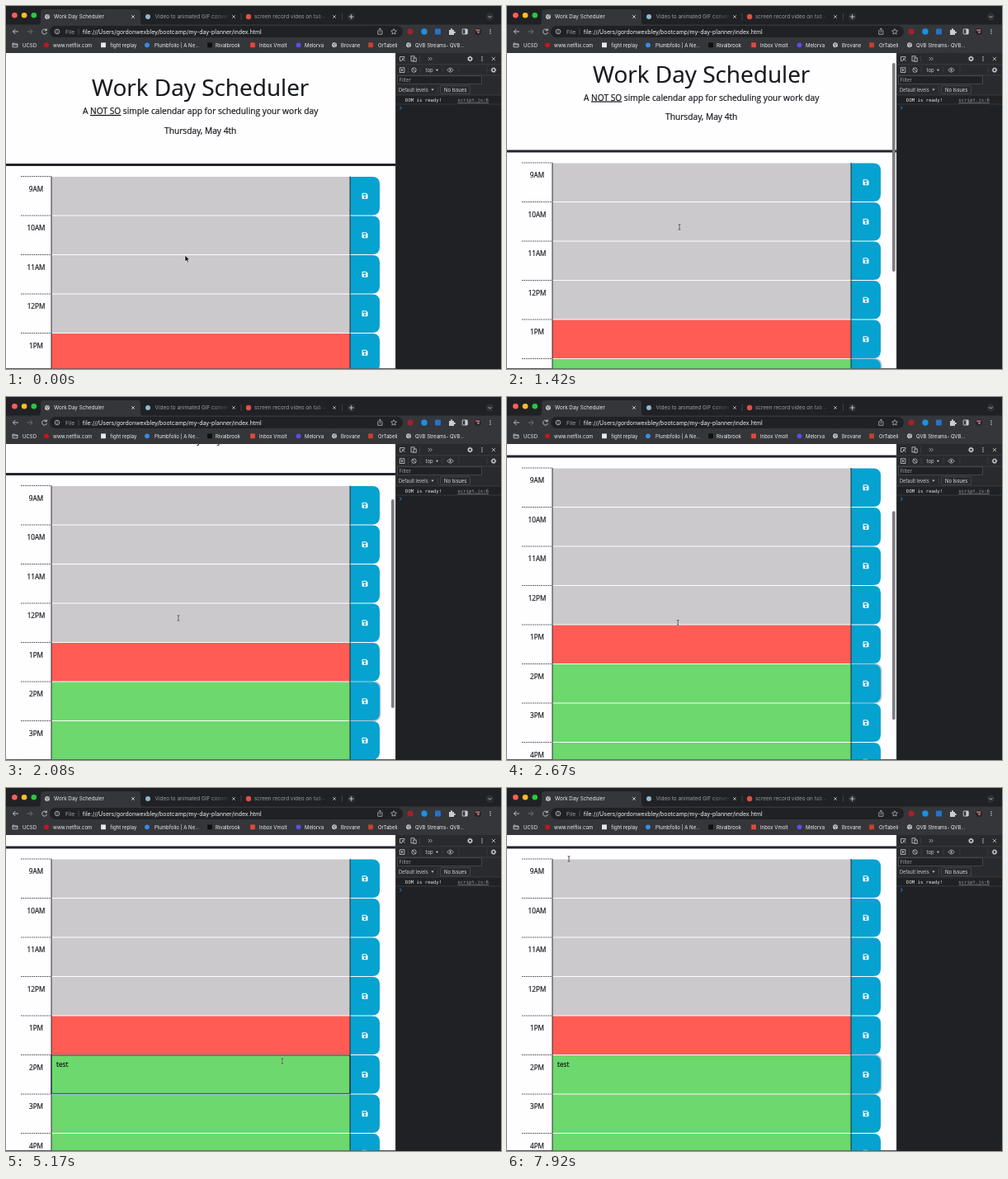
Animation of 600x440 px, one loop 8000 ms. Source, as an HTML page:

```html
<!DOCTYPE html>
<html lang="en">
<head>
<meta charset="utf-8">
<title>Work Day Scheduler</title>
<style>
  html, body { margin: 0; width: 100%; height: 100%; overflow: hidden; background: #202124; }
  svg { display: block; width: 600px; height: 440px; }
  text { white-space: pre; }
  #page text { stroke: #0c0d10; stroke-width: .18px; }
</style>
</head>
<body>
<svg id="stage" viewBox="0 0 600 440" xmlns="http://www.w3.org/2000/svg"></svg>
<script>
const LOOP = 8000;
const UI = "Inter, sans-serif";
const PAGE = "'Open Sans', sans-serif";
const MONO = "'DejaVu Sans Mono', monospace";
const INK = "#15171b", ICON = "#c9cbce", BAR = "#35363a", DARK = "#202124";
const ROW_TOP = 206.5, PITCH = 47.5, MAX_SCROLL = 120.5;

const text = (x, y, s, size, fill, font = UI, extra = "") =>
  `<text x="${x}" y="${y}" font-size="${size}" fill="${fill}" font-family="${font}" ${extra}>${s}</text>`;
const rect = (x, y, w, h, fill, extra = "") =>
  `<rect x="${x}" y="${y}" width="${w}" height="${h}" fill="${fill}" ${extra}/>`;
const dot = (x, y, r, fill, extra = "") =>
  `<circle cx="${x}" cy="${y}" r="${r}" fill="${fill}" ${extra}/>`;
const line = (d, stroke = ICON, w = 0.9, extra = "") =>
  `<path d="${d}" fill="none" stroke="${stroke}" stroke-width="${w}" ${extra}/>`;

const cross = (x, y, r = 1.8, c = ICON) =>
  line(`M${x - r} ${y - r}l${2 * r} ${2 * r}m0 ${-2 * r}l${-2 * r} ${2 * r}`, c, 0.8);
const globe = (x, y) => dot(x, y, 3, "#c3c6ca") +
  line(`M${x - 2} ${y - 1}q2 .2 1.8 1.6t1.6 1.6M${x + 0.6} ${y - 2.4}q-.4 1.8 1.6 2`, "#55585d", 0.8);
const folder = (x, y) =>
  line(`M${x - 3} ${y - 2.2}h2.2l.8.9h3v3.8h-6zM${x - 3} ${y - 0.4}h6`, "#d5d7da", 0.8);
const dots = (x, y) => [-2.2, 0, 2.2].map(d => dot(x, y + d, 0.75, ICON)).join("");
const gear = (x, y) => dot(x, y, 2, "none", `stroke="${ICON}" stroke-width="1.3"`) +
  dot(x, y, 2.9, "none", `stroke="${ICON}" stroke-width=".9" stroke-dasharray="1.1 1.18"`);
const caretDown = (x, y) => `<path d="M${x - 1.6} ${y - 1}h3.2l-1.6 2.3z" fill="${ICON}"/>`;

function tabs() {
  let s = rect(0, 0, 600, 23, DARK);
  ["#fe5f57", "#febc2e", "#28c840"].forEach((c, i) => s += dot(10.4 + 11.7 * i, 11.3, 3.3, c));
  s += `<path d="M38 23q4 0 4-4V8q0-4 4-4H159q4 0 4 4V19q0 4 4 4z" fill="${BAR}"/>`;
  s += globe(50, 13) + text(58, 15.3, "Work Day Scheduler", 6.3, "#e8eaed") + cross(154, 13, 1.8, "#e8eaed");
  s += dot(172, 13, 3, "#8fb6cf") + text(180.6, 15.3, "Video to animated GIF conver", 6.4, "#9a9da1");
  s += dot(294, 13, 3.2, "#dd5145") + text(301, 15.3, "screen record video on tab - ", 6.4, "#9a9da1");
  for (const x of [272, 394])
    s += rect(x - 22, 8, 22, 10, "url(#fade)") + rect(x, 8, 9, 10, DARK) + cross(x + 4, 13);
  s += line("M285 9v8M407.5 9v8", "#55585c", 0.6);
  s += dot(418.6, 13, 4.5, "#303135") + line("M415.8 13h5.6M418.6 10.2v5.6");
  s += dot(586.5, 13, 4.5, "#303135") + line("M584.6 12.2l1.9 1.9 1.9-1.9");
  return s;
}

function toolbar() {
  let s = rect(0, 22.5, 600, 34.5, BAR);
  s += line("M15 31H8.5M11.4 28L8.4 31l3 3");
  s += line("M25.5 31H32M29.1 28l3 3-3 3", "#74777c");
  s += line("M49 29.3A3 3 0 1 0 49.5 32M49.3 27.4v2.4h-2.4");
  s += rect(53, 24, 428, 14, DARK, 'rx="7"');
  s += dot(62, 31, 2.8, "none", `stroke="${ICON}" stroke-width=".8"`) + line("M62 30.6v2M62 29v.8", ICON, 0.8);
  s += text(72, 33.7, "File", 6.8, "#9aa0a6") + line("M88 27.5v7", "#5f6368", 0.7);
  s += text(92.7, 33.7, "file:///Users/gordonwexbley/bootcamp/my-day-planner/index.html", 6.93, "#eef0f2");
  s += line("M452 29.8h-1.3v4.5h5.2v-4.5h-1.3M453.3 32.4v-5.2M451.7 28.6l1.6-1.6 1.6 1.6", ICON, 0.7);
  s += line("M470 27.7l1 2.1 2.4.3-1.8 1.6.5 2.4-2.1-1.2-2.1 1.2.5-2.4-1.8-1.6 2.4-.3z", ICON, 0.7);
  s += dot(490, 31, 3.5, "#a3222b") + dot(507, 31, 3.7, "#1e8fe0") + rect(520, 27.5, 7, 7, "#2473c8", 'rx="1"');
  s += `<path d="M537 29h2q-.4-2 1-2t1 2h2v2q2-.4 2 1t-2 1v2h-6z" fill="${ICON}"/>`;
  s += rect(553.2, 28, 6, 6, "none", `stroke="${ICON}" stroke-width=".9" rx=".5"`) + rect(556.4, 28, 2.8, 6, ICON);
  s += dot(572, 31, 4, "#2a2022") + rect(569.3, 28.3, 5, 2, "#b76b70") + dot(572.5, 31.8, 1.4, "#8b8589");
  s += dots(587, 31);

  const disc = c => (x, y) => dot(x, y, 2.9, c);
  const tile = c => (x, y) => rect(x - 2.9, y - 2.9, 5.8, 5.8, c);
  const marks = [
    [11, 20, "UCSD", folder], [49, 57, "www.netflix.com", disc("#c4161f")],
    [118, 126.3, "fight replay", tile("#e8eaed")], [171, 180, "Plumbfolio | A Ne...", disc("#3a8de0")],
    [247, 254, "Rivalbrook", tile("#0c120e")], [299, 307, "Inbox Vmolt", tile("#e0483c")],
    [354.5, 362, "Melorva", disc("#5b4df0")], [398, 406, "Brovane", globe],
    [442, 451, "OrTabeli", tile("#c8402f")], [488, 496, "QVB Streams- QVB...", globe]
  ];
  for (const [ix, tx, name, icon] of marks)
    s += icon(ix, 47.3) + text(tx, 49.5, name, 6, "#eceef0");
  return s;
}

function devtools() {
  let s = rect(472, 57, 128, 383, DARK) + rect(472, 57, 128, 51, "#292a2d");
  s += line("M472 70.8h128M472 84h128M472 108h128M472 119h128", "#46484c", 0.6);
  s += line("M472.4 57v383", "#46484c", 0.7);
  s += line("M480 66.5h-2.5v-5h5.5v2M480.5 63.8l3 3M480.5 66v-2.2h2.2", ICON, 0.8);
  s += rect(491, 60.8, 4, 6, "none", `stroke="${ICON}" stroke-width=".8"`) + rect(494, 63, 3.2, 4.2, "#292a2d", `stroke="${ICON}" stroke-width=".8"`);
  s += line("M487.5 73.5v8M501.5 60v8M502 73.5v8M529 73.5v8M549 73.5v8M583 73.5v8", "#46484c", 0.6);
  s += line("M511.8 62l2 2-2 2M514.4 62l2 2-2 2", ICON, 0.7);
  s += gear(562.5, 64) + dots(577, 64) + cross(591, 64, 2.1);
  s += rect(477.3, 74.8, 5.6, 5.6, "none", `stroke="${ICON}" stroke-width=".8"`) + `<path d="M479.2 76v3.2l2.4-1.6z" fill="${ICON}"/>`;
  s += dot(494.5, 77.6, 2.7, "none", `stroke="${ICON}" stroke-width=".8"`) + line("M492.6 75.7l3.8 3.8", ICON, 0.8);
  s += text(508.5, 79.8, "top", 6, ICON) + caretDown(522.5, 77.8);
  s += line("M534.8 77.6q3.7-5 7.4 0q-3.7 5-7.4 0z", ICON, 0.8) + dot(538.5, 77.6, 1.1, ICON) + gear(591, 77.6);
  s += rect(474.3, 84.8, 102, 9.8, DARK, 'stroke="#5a5c60" stroke-width=".6"') + text(476.5, 92.1, "Filter", 6, "#9aa0a6");
  s += text(476, 103.7, "Default levels", 5.6, ICON) + caretDown(517, 101.5);
  s += line("M523.5 97v9", "#46484c", 0.6);
  s += rect(526.5, 96.6, 36, 9.6, "none", 'stroke="#55575b" stroke-width=".6" rx="1"') + text(531, 103.7, "No Issues", 5.85, "#dfe1e5");
  s += text(484, 116, "DOM is ready!", 5.65, "#e3e5e8", MONO);
  s += text(585, 116, "script.js:6", 5.7, "#9aa0a6", MONO, 'text-anchor="end" text-decoration="underline"');
  s += line("M477 121.5l2.6 2-2.6 2", "#2f7fd6", 0.9);
  return s;
}

const SAVE = "M-3.5-2.8q0-.7.7-.7h4.3l2 2v4.3q0 .7-.7.7h-5.6q-.7 0-.7-.7zM-2.4-2.4v1.9h3.9v-1.9zM1.2 1.5a1.2 1.2 0 1 0-2.4 0a1.2 1.2 0 1 0 2.4 0z";
const button = y => `M417 ${y + 0.5}h27q9 0 9 9v28.5q0 9-9 9h-27z`;

function row(label, i) {
  const y = ROW_TOP + PITCH * i;
  const fill = i < 4 ? "#cbc9cc" : i === 4 ? "#fe5c54" : "#6dd86d";
  return line(`M18 ${y}h37`, "#222", 0.8, 'stroke-dasharray="1.6 1"') +
    text(36.5, y + 18.3, label, 8.2, INK, PAGE, 'text-anchor="middle"') +
    rect(55, y + 0.5, 362, PITCH - 1, fill) +
    `<path d="${button(y)}" fill="#06a2d0"/>` +
    line(`M55 ${y}v${PITCH}M417 ${y}v${PITCH}`, "#1c1c20", 0.9) +
    `<path transform="translate(435 ${y + 23.7})" d="${SAVE}" fill="#fff" fill-rule="evenodd"/>`;
}

function page() {
  const mid = 'text-anchor="middle"', y2 = ROW_TOP + PITCH * 5;
  let s = text(235.7, 109.3, "Work Day Scheduler", 28, INK, PAGE, mid);
  s += text(235.7, 131, 'A <tspan text-decoration="underline">NOT SO</tspan> simple calendar app for scheduling your work day', 10.2, INK, PAGE, mid);
  s += text(235.7, 154.6, "Thursday, May 4th", 10.2, INK, PAGE, mid);
  s += rect(0, 191, 472, 3, "#25232d");
  s += `<path id="halo" d="${button(y2)}" fill="none" stroke="#8fa3b5" stroke-opacity=".6" stroke-width="3"/>`;
  s += ["9AM", "10AM", "11AM", "12PM", "1PM", "2PM", "3PM", "4PM", "5PM"].map(row).join("");
  s += `<g id="focus">${rect(55, y2 + 0.4, 362, PITCH - 1, "none", 'stroke="#12263a" stroke-width="1"')}${line(`M55 ${y2 + PITCH + 0.2}h362`, "#7fc0e8", 0.8)}</g>`;
  s += text(61, y2 + 14.6, "", 8.2, INK, PAGE, 'id="note"');
  return s;
}

const BEAM = "M-1.4-3.4q1.4 0 1.4 1v4.8q0 1-1.4 1M1.4-3.4Q0-3.4 0-2.4M1.4 3.4Q0 3.4 0 2.4";
const stage = document.getElementById("stage");
stage.innerHTML = `<defs>
  <linearGradient id="fade"><stop offset="0" stop-color="${DARK}" stop-opacity="0"/><stop offset="1" stop-color="${DARK}"/></linearGradient>
  <clipPath id="view"><rect x="0" y="57" width="472" height="382.3"/></clipPath></defs>
  ${rect(0, 0, 600, 440, DARK)}${tabs()}${toolbar()}
  <g clip-path="url(#view)">${rect(0, 57, 472, 383, "#fefdff")}<g id="page">${page()}</g>
  ${rect(467, 58, 3.6, 253, "#7c7b7e", 'id="thumb" rx="1.8"')}</g>
  ${devtools()}
  <g id="cursor">
    <path id="arrow" d="M0 0v8l1.9-1.7 1.3 2.9 1.3-.6-1.3-2.8h2.5z" fill="#111" stroke="#fff" stroke-width=".6"/>
    <g id="beam">${line(BEAM, "#fff", 1.9, 'stroke-opacity=".6"')}${line(BEAM, "#222", 0.8)}</g>
    <path id="hand" d="M-.8-3.5q.8-1 1.5 0v3l3 .8q.9.3.7 1.4l-.7 3h-4l-2.6-3.4q.2-1.2 2.1.2z" fill="#fff" stroke="#111" stroke-width=".6"/>
  </g>`;

const $ = id => document.getElementById(id);
const show = (id, on) => $(id).setAttribute("visibility", on ? "visible" : "hidden");
const ease = (t, a, b) => {
  const u = Math.min(1, Math.max(0, (t - a) / (b - a)));
  return u * u * (3 - 2 * u);
};

// Pointer legs: start, end, target x, target y, vertical bend
const LEGS = [
  [400, 1000, 209, 268, 0],
  [2550, 3250, 186, 340, 0],
  [4750, 5490, 433, 345, -12.5],
  [6250, 6880, 192, 289, 0],
  [6980, 7820, 75, 86, 0]
];

function pointer(t) {
  let x = 217, y = 302;
  for (const [a, b, tx, ty, bend] of LEGS) {
    const p = ease(t, a, b);
    x += (tx - x) * p;
    y += (ty - y) * p + 4 * bend * p * (1 - p);
  }
  return [x, y];
}

function draw(t) {
  // The page scrolls in half-pixel steps
  const scroll = Math.round(2 * MAX_SCROLL * ease(t, 1112, 2437)) / 2;
  $("page").setAttribute("transform", `translate(0 ${-scroll})`);
  $("thumb").setAttribute("y", 58 + scroll * 0.666);
  show("thumb", t > 1112 && t < 3000);

  const editing = t >= 3400 && t < 5900;
  show("focus", editing);
  show("halo", !editing);
  const typed = t < 4300 ? 0 : 1 + Math.floor((t - 4300) / 150);
  $("note").textContent = "test".slice(0, typed);

  const [x, y] = pointer(t);
  const kind = x > 417 ? "hand" : t < 550 ? "arrow" : "beam";
  for (const k of ["arrow", "beam", "hand"]) show(k, k === kind);
  $("cursor").setAttribute("transform", `translate(${x} ${y})`);
}

const start = performance.now();
function tick() {
  draw((performance.now() - start) % LOOP);
  requestAnimationFrame(tick);
}
tick();
</script>
</body>
</html>
```
